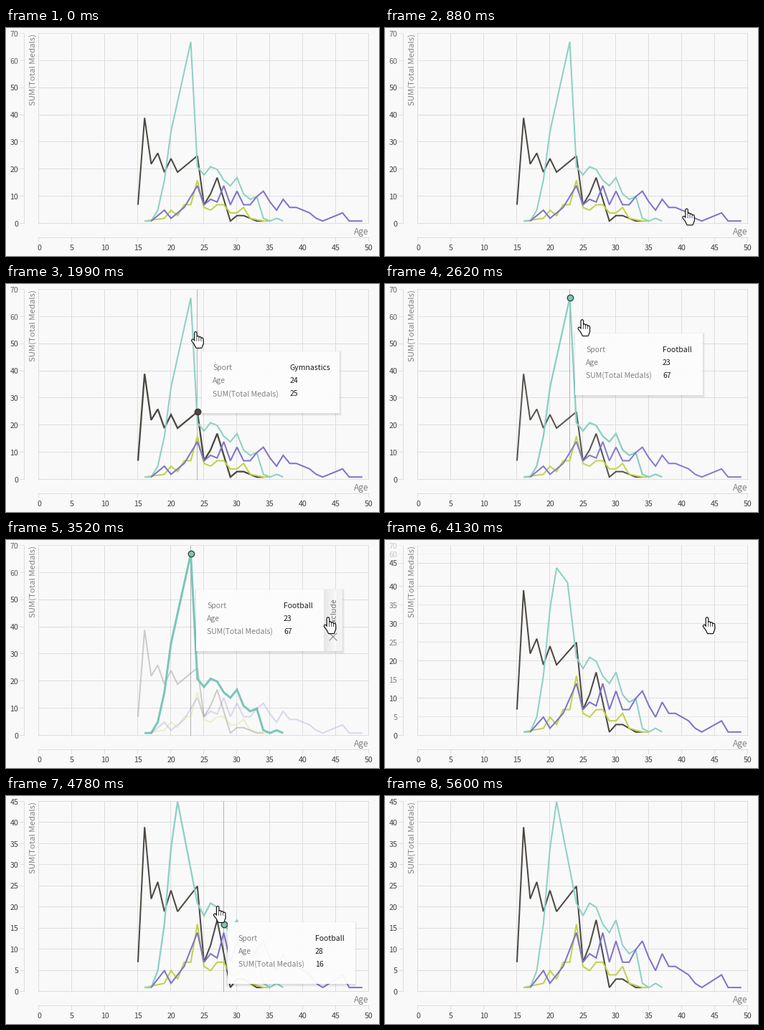
Write a matplotlib script that moves like this. It is 520 px wide and 318 px high and loops after 6.41 s.

```python
import numpy as np
import matplotlib.pyplot as plt
from matplotlib.animation import FuncAnimation
from matplotlib.colors import to_rgb
from matplotlib.patches import Polygon, Rectangle
from matplotlib.transforms import Affine2D

W, H, DPI = 520, 318, 64
LOOP, FRAMES = 6410, 320
STEP = LOOP / FRAMES
PX = 72 / DPI                      # points per pixel

LEFT, RIGHT, TOP, BASE = 46, 506, 8, 273
KX = (RIGHT - LEFT) / 50
K_OLD, K_NEW = (BASE - TOP) / 70, (BASE - TOP) / 45  # pixels per medal

CLICK, EXCLUDE, LAG = 2560, 3800, 75
GRID, LABEL, GREY = "#dedede", "#404040", "#828282"
NAN = np.nan
plt.rcParams["font.family"] = "Noto Sans CJK JP"

fig = plt.figure(figsize=(W / DPI, H / DPI), dpi=DPI, facecolor="#f9f9f9")
ax = fig.add_axes([0, 0, 1, 1])
ax.axis("off")


def ease(t, start, length):
    u = min(max((t - start) / length, 0), 1)
    return u * u * (3 - 2 * u)


def mix(a, b, p):
    return a + (b - a) * p


def crisp(v):
    """Centre of the pixel that a hairline at v falls on."""
    return round(v) - 0.5


def line(x, y, color, width=1, z=1, **kw):
    return ax.plot(x, y, color=color, lw=width * PX, zorder=z, snap=False, **kw)[0]


def text(x, y, s, size=10.6, color=LABEL, z=3, **kw):
    kw.setdefault("va", "baseline")
    return ax.text(x, y, s, fontsize=size * PX, color=color, zorder=z, **kw)


def show(parts, visible):
    for part in parts:
        part.set_visible(visible)


# ---- axes ----
line([25.5, 25.5], [TOP, BASE], GRID)
line([LEFT, RIGHT], [292.5, 292.5], GRID)
for age in range(0, 51, 5):
    x = crisp(LEFT + KX * age)
    line([x, x, NAN, x, x], [TOP, BASE, NAN, 292, 298], GRID)
    text(x + 0.5, 310, str(age), ha="center")
text(RIGHT, 288, "Age", 12, GREY, ha="right")
text(37.5, 58, "SUM(Total Medals)", 11.4, GREY, rotation=90,
     ha="center", va="center")


class Tick:
    """A y tick that slides from one height to another while fading."""

    def __init__(self, value, start, end, fade):
        self.start, self.end, self.fade = start, end, fade
        self.rule = line([20, 25, NAN, LEFT, RIGHT], [0] * 5, GRID, z=0.5)
        self.label = text(17.2, 0, str(value), ha="right")

    def update(self, p):
        y, alpha = mix(self.start, self.end, p), min(max(self.fade(p), 0), 1)
        self.rule.set_ydata([crisp(y)] * 2 + [NAN] + [crisp(y)] * 2)
        self.label.set_y(y + 3.7)
        for part in (self.rule, self.label):
            part.set_alpha(alpha)
        show((self.rule, self.label), alpha > 0.01)


def old_y(v):
    return BASE - v * K_OLD


def new_y(v):
    return BASE - v * K_NEW


ticks = []
for v in range(0, 41, 10):
    ticks.append(Tick(v, old_y(v), new_y(v), lambda p: 1))
for v in range(5, 36, 10):
    ticks.append(Tick(v, old_y(v), new_y(v), lambda p: p))
for v in (60, 70):
    ticks.append(Tick(v, old_y(v), TOP, lambda p: 0.8 * (1 - p)))
# 50 turns into the new top value
ticks.append(Tick(50, old_y(50), TOP, lambda p: 1 - 4 * p))
ticks.append(Tick(45, old_y(50), TOP, lambda p: 4 * p))


# ---- series: one value per year of age ----
class Series:
    def __init__(self, name, color, first, values, z):
        self.name, self.color = name, color
        self.values = np.array(values, dtype=float)
        self.ages = first + np.arange(len(values), dtype=float)
        self.line = line([], [], color, 2, z, solid_joinstyle="miter",
                         solid_capstyle="butt")

    def drop(self, age):
        keep = self.ages != age
        self.ages, self.values = self.ages[keep], self.values[keep]


gymnastics = Series("Gymnastics", "#4b4741", 15, [
    7, 39, 22, 26, 19, 24, *range(19, 26, 2), 7, 11, 17, 9, 1, 3, 3, 2, 1, 1], 5)
green = Series("", "#c3d048", 16, [
    *np.linspace(1, 2, 4), 5, 3, 7, 7, 16, 6, 5, 7, 7, 4, 4, 6, 2, 1.5, 1, 1], 6)
football = Series("Football", "#8dd0c5", 16, [
    1, 1, 5, 16, *range(34, 68, 11), 21, 18, 21, 20, 16, 14, 17, 11, 9, 10,
    2, 1, 2, 1], 7)
purple = Series("", "#7d73c9", 17, [
    1, 3, 5, 2, 4, 6, 10, 14, 7, 9, 8, 14, 7, 12, 7, 7, 10, 12, 8, 5, 9, 6, 6,
    5, 4, 2, *range(1, 5), 1, 1, 1], 8)
football.drop(22)
all_series = [gymnastics, green, football, purple]
peak = int(np.argmax(football.values))
teal, deep_teal = (np.array(to_rgb(c)) for c in ("#8dd0c5", "#7ac6b9"))

cross = line([0, 0], [TOP, BASE], "#b4b4b4", z=4)
marker = line([0], [0], "none", z=9, marker="o", markersize=8.5 * PX,
              mec="#35322e", mew=1.2 * PX)

# ---- tooltip, drawn from its top left corner ----
tip_move = Affine2D()
tip_space = tip_move + ax.transData
SPREAD = (0.5, 1.5, 2.5)
shadows = [Rectangle((-g, 1 - g), 1, 86 + 2 * g, fc="black", alpha=0.035,
                     zorder=10) for g in SPREAD]
card = Rectangle((0, 0), 1, 86, fc="white", alpha=0.94, zorder=11)
bar = Rectangle((178, 0), 1, 86, fc="#f3f3f3", zorder=12)
for box in shadows + [card, bar]:
    ax.add_patch(box)
    box.set_edgecolor("none")
    box.set_transform(tip_space)

tip_values, tip_parts = [], shadows + [card]
for row, name in enumerate(("Sport", "Age", "SUM(Total Medals)")):
    y = 26 + 18 * row
    tip_parts.append(text(15, y, name, 10.5, GREY, 13, transform=tip_space))
    tip_values.append(text(122, y, "", 10.5, "#1c1c1c", 13, transform=tip_space))
tip_parts += tip_values

glow = ax.imshow(np.linspace(0.9, 0.97, 18)[None], cmap="gray", vmin=0, vmax=1,
                 extent=(443, 460, 155, 69), aspect="auto", zorder=12.5)
bar_parts = [
    text(191.5, 31, "Exclude", 10.6, "#6e6e6e", 13, rotation=90, ha="center",
         va="center", transform=tip_space),
    line([186, 196, NAN, 186, 196], [61, 71, NAN, 71, 61], "#808080",
         z=13, transform=tip_space)]

# ---- hand cursor: round strokes for fingers, drawn from its fingertip ----
hand_move = Affine2D()
hand_space = hand_move + ax.transData
finger_x, finger_y = [-4, 0, NAN], [12, 17, NAN]     # thumb
for x, y in zip(np.arange(4) * 3, (1.5, 7.5, 8.5, 10)):
    finger_x += [x, x, NAN]
    finger_y += [y, 16, NAN]
palm = [(-1, 13), (10, 13), (10, 17), (8, 22), (1, 22), (-1, 18)]
hand = []
for z, color, grow in ((20, "#111111", 2.4), (21, "white", 0)):
    hand.append(line(finger_x, finger_y, color, 2.3 + grow, z,
                     solid_capstyle="round", transform=hand_space))
    hand.append(ax.add_patch(Polygon(palm, fc=color, ec=color, lw=grow * PX,
                                     joinstyle="round", zorder=z)))
    hand[-1].set_transform(hand_space)

ax.set_xlim(0, W)
ax.set_ylim(H, 0)

# stops of the cursor: time, x, y
STOPS = np.array([
    (580, 520, 300), (1180, 322, 205), (1320, 298, 188), (1450, 294, 186),
    (1930, 265, 68), (2050, 264, 66), (2310, 257, 43), (CLICK, 257, 43),
    (3200, 435, 112), (3520, 449, 108), (4390, 449, 108), (4710, 301, 150),
    (4790, 295, 154), (5060, 250, 188), (5600, -20, 270)]).T


def cursor(t):
    return [np.interp(t, STOPS[0], place) for place in STOPS[1:]]


def draw_hover(t, k):
    """Crosshair, marker and tooltip; returns the hovered series."""
    pinned = 2310 <= t < EXCLUDE
    x, y = cursor(min(t - LAG, CLICK) if pinned else t - LAG)
    shown = 580 < t < 5500 and 189 < x < 386
    show(tip_parts + [cross, marker], shown)
    if not shown:
        return None
    s = gymnastics if 1800 <= t < 2100 else football
    ages, values = s.ages, s.values
    if s is football and t >= EXCLUDE:
        ages, values = np.delete(ages, peak), np.delete(values, peak)
    i = int(np.argmin(abs(ages - (x - LEFT) / KX)))
    px, py = LEFT + KX * ages[i], BASE - k * values[i]
    cross.set_xdata([crisp(px)] * 2)
    marker.set_data([px], [py])
    marker.set_markerfacecolor(deep_teal if s is football else s.color)

    width = 178 if s is football else 192
    slide = 26 * ease(t, CLICK + 140, 300) if pinned else 0
    tip_move.clear().translate(min(x + 8, W - 2 - width), y + 26)
    for box, grow in zip(shadows, SPREAD):
        box.set_width(width + slide + 2 * grow)
    card.set_width(width + slide)
    bar.set_width(slide)
    for label, value in zip(tip_values, (s.name, int(ages[i]), int(values[i]))):
        label.set_text(str(value))
    return s


def update(i):
    t = (i + 1) * STEP
    p = ease(t, EXCLUDE, 560)
    for tick in ticks:
        tick.update(p)

    k = mix(K_OLD, K_NEW, p)
    hovered = draw_hover(t, k)
    chosen = ease(t, CLICK, 350) if t < EXCLUDE else 0
    for s in all_series:
        ages, y = s.ages.copy(), BASE - k * s.values
        width = 2.3 if s is hovered else 2
        if s is football:
            # the excluded peak melts into the line between its neighbours
            ages[peak] = mix(23, 22.5, p)
            y[peak] = mix(old_y(67), new_y(33), p)
            s.line.set_color(mix(teal, deep_teal, chosen))
            width = max(width, 2 + chosen)
        else:
            s.line.set_alpha(1 - 0.75 * chosen)
        s.line.set_data(LEFT + KX * ages, y)
        s.line.set_linewidth(width * PX)

    show([bar], CLICK + 140 < t < EXCLUDE)
    show(bar_parts, CLICK + 360 < t < EXCLUDE)
    show([glow], 3300 < t < EXCLUDE)

    hand_move.clear().translate(*cursor(t))
    show(hand, 580 <= t < 5600)
    return []


anim = FuncAnimation(fig, update, frames=FRAMES, interval=STEP,
                     init_func=lambda: update(0), repeat=True, repeat_delay=0)
plt.show()
```
